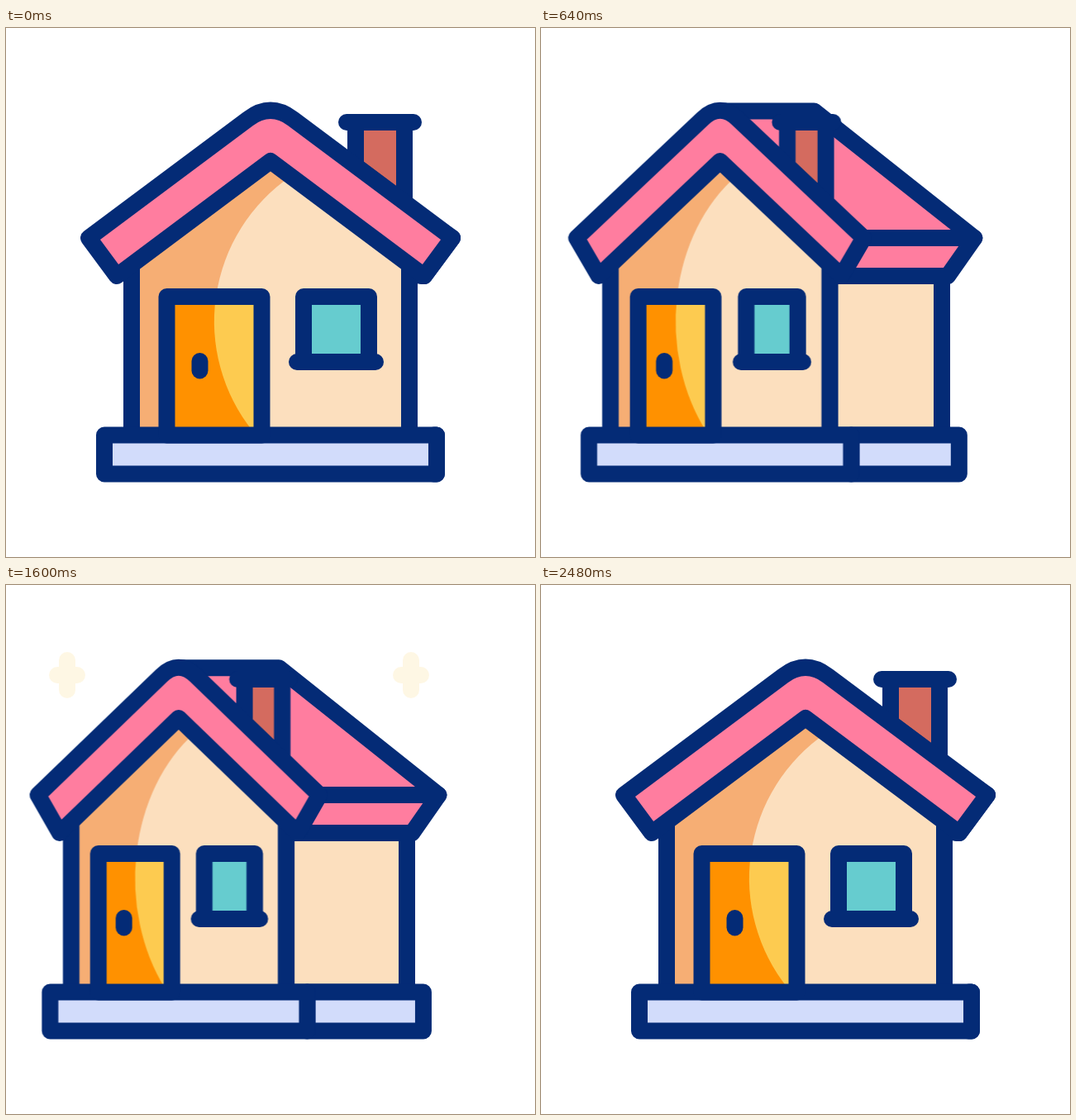
An HTML page that plays this animation: 640x640 px, repeating every 3 s.

```html
<!DOCTYPE html>
<html lang="en">
<head>
<meta charset="utf-8">
<title>House</title>
<style>
  html, body { margin: 0; width: 100%; height: 100%; overflow: hidden; background: #fff; }
  svg { display: block; width: 100vw; height: 100vh; }

  .house * {
    stroke: #042b76;
    stroke-width: 20;
    stroke-linecap: round;
    stroke-linejoin: round;
    vector-effect: non-scaling-stroke;
  }
  .house .plain { stroke: none; }
  .line { fill: none; }
  .pink { fill: #ff7d9f; }
  .wall { fill: #fcdfbe; }
  .shade { fill: #f6ae74; }
  .base { fill: #d2dcfb; }
  .brick { fill: #d46b5f; }
  .glass { fill: #66cccf; }
  .door { fill: #ff9100; }
  .glow { fill: #fdcb50; }

  .front, .side path { animation: 3s cubic-bezier(.62, 0, .17, 1) infinite; }
  .front { animation-name: turn; }
  .side path { animation-name: morph; d: var(--a); }

  /* The front face narrows and slides left while the side opens */
  @keyframes turn {
    0%, 80%, 100% { transform: translate(0, 0) scale(1, 1); }
    33.333% { transform: translate(-40.1px, 0) scale(.766, 1); }
    46.667% {
      transform: translate(-40.1px, 0) scale(.766, 1);
      animation-timing-function: cubic-bezier(.73, 0, .295, 1);
    }
  }
  @keyframes morph {
    0%, 80%, 100% { d: var(--a); }
    33.333% { d: var(--b); }
    46.667% { d: var(--b); animation-timing-function: cubic-bezier(.73, 0, .295, 1); }
  }

  .side-wall {
    --a: path("M488 300L485 300L485 492.5L488 492.5Z");
    --b: path("M333.7 300L485 300L485 492.5L333.7 492.5Z");
  }
  .side-base {
    --a: path("M521 492.5L517.5 492.5L517.5 539.5L521 539.5Z");
    --b: path("M358.9 492.5L504.5 492.5L504.5 539.5L358.9 539.5Z");
  }
  .eave {
    --a: path("M540 254L536.6 254L502 300L506 300Z");
    --b: path("M373.5 254L523 254L491 300L347.5 300Z");
  }
  .slope {
    --a: path("M320 104L333 104L536.6 254L540 254Z");
    --b: path("M205 100L330 100L523 254L373.5 254Z");
  }

  .stars { fill: none; stroke: #fdcb50; stroke-width: 20; stroke-linecap: round; }
  .stars g { opacity: 0; animation: shine 3s linear infinite; }
  .stars .dots { stroke-width: 16; animation-name: blink; }
  @keyframes shine {
    0%, 32.5%, 54.333%, 100% { opacity: 0; }
    38%, 48% { opacity: 1; }
  }
  @keyframes blink {
    0%, 32.5%, 53.333%, 100% { opacity: 0; }
    37%, 46.667% { opacity: 1; }
  }
</style>
</head>
<body>
<svg viewBox="0 0 640 640">
  <g class="stars">
    <g><path d="M74 91V127M62 109H86M490 91V127M478 109H502"/></g>
    <g class="dots"><path d="M168 55h.01M520 200h.01"/></g>
  </g>

  <g class="house">
    <g class="side">
      <path class="wall side-wall"/>
      <path class="base side-base"/>
      <path class="pink eave"/>
      <path class="pink slope"/>
    </g>

    <g class="front">
      <path class="brick" d="M423 114V167L482 211V114Z"/>
      <path class="line" d="M412 114H493"/>

      <path class="shade plain" d="M152 287L320 161L488 287V492H152Z"/>
      <path class="wall plain" d="M345 179A213 213 0 0 0 298.6 488L488 492V287Z"/>
      <path class="line" d="M152 287V492.5M488 287V492.5"/>

      <path class="base" d="M119 492.5H521V539.5H119Z"/>

      <path class="door plain" d="M194.5 325H309.5V492.5H194.5Z"/>
      <path class="glow plain" d="M254 325A213 213 0 0 0 298.6 488H309.5V325Z"/>
      <path class="line" d="M194.5 325H309.5V492.5H194.5Z"/>
      <path class="line" d="M234.5 403V414.5"/>

      <path class="glass" d="M360 325H439V404H360Z"/>
      <path class="line" d="M352 404H447"/>

      <path class="pink" d="M100 254L293 109.9Q320 89.7 347 109.9L540 254L506 300L320 161L134 300Z"/>
    </g>
  </g>
</svg>
</body>
</html>
```
